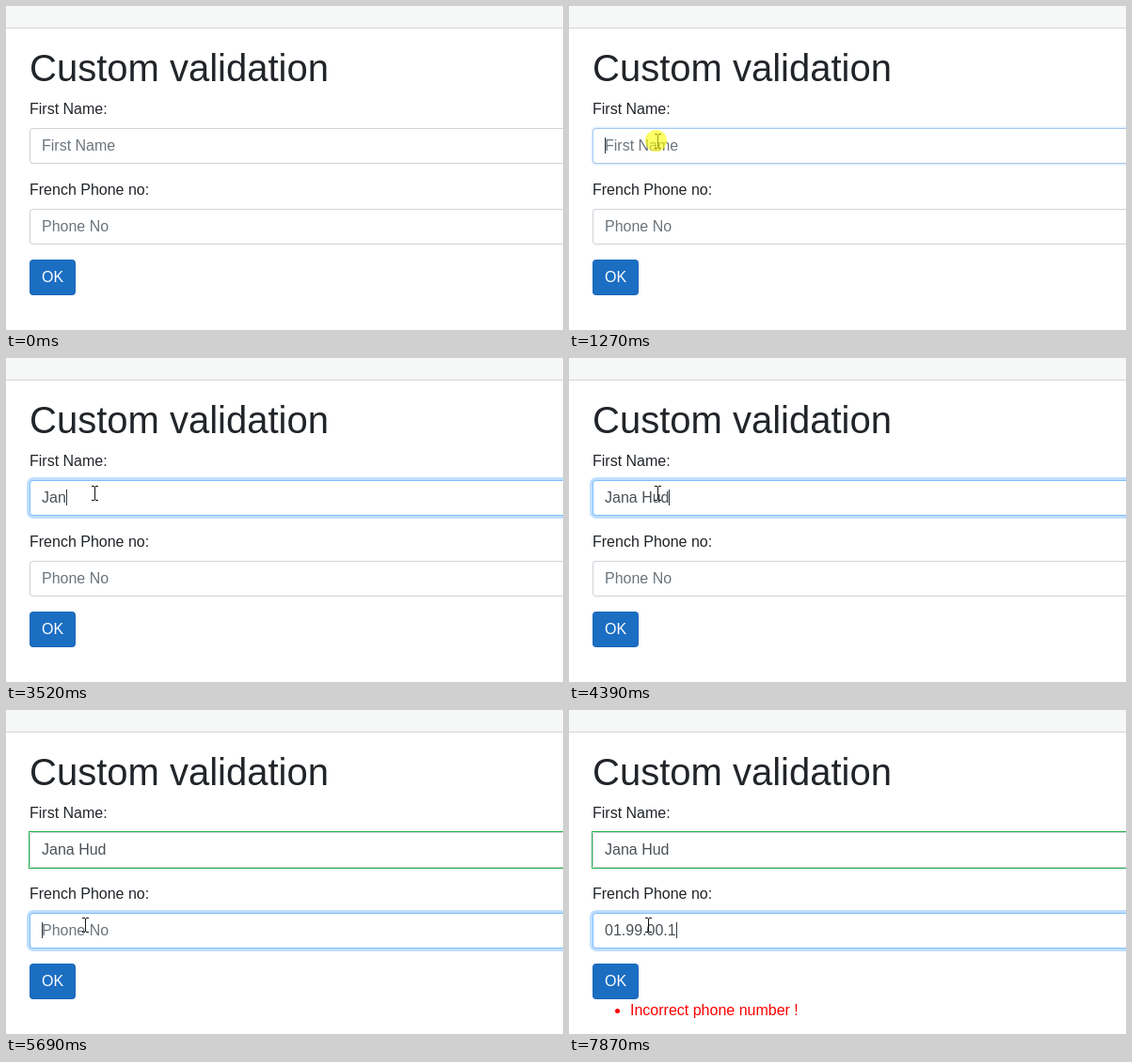
An HTML page with a canvas that plays this animation: 592 px wide and 345 px high, repeating every 8 s.

```html
<!DOCTYPE html>
<html lang="en">
<head>
<meta charset="utf-8">
<title>Custom validation</title>
<style>
  html, body { margin: 0; width: 100%; height: 100%; overflow: hidden; background: #fff; }
  canvas { display: block; width: 592px; height: 345px; }
</style>
</head>
<body>
<canvas id="stage" width="592" height="345"></canvas>
<script>
const ctx = document.getElementById('stage').getContext('2d');
const W = 592, H = 345, LOOP = 8000;
const FONT = '"Liberation Sans", Arial, sans-serif';
const INK = '#212529', RED = '#f00';

// All times in ms
const NAME_CLICK = 1190, PHONE_CLICK = 5540, FADE_STEP = 70, BLINK = 540;
const name = { text: 'Jana Hud', runs: [{ from: 2830, gap: 140, n: 2 }, { from: 3520, gap: 174, n: 6 }] };
const phone = { text: '0199001', runs: [{ from: 6090, gap: 296, n: 7 }] };

const clamp = (v, lo, hi) => Math.min(hi, Math.max(lo, v));
const mix = (a, b, k) => a + (b - a) * k;

// Eased 0..1 progress, held for a number of equal steps
function glide(t, from, to, steps) {
  const p = Math.floor(clamp((t - from) / (to - from), 0, 1) * steps) / steps;
  return Math.sin(p * Math.PI / 2);
}

const fade = (t, from) => clamp(Math.floor((t - from) / FADE_STEP) / 2, 0, 1);

// Text typed so far and the time of the last key
function typing(t, { text, runs }) {
  let count = 0, last = 0;
  for (const { from, gap, n } of runs) {
    const done = clamp(Math.floor((t - from) / gap) + 1, 0, n);
    if (done) last = from + (done - 1) * gap;
    count += done;
  }
  return { value: text.slice(0, count), last };
}

const blinkOn = (t, since) => Math.floor((t - since) / BLINK) % 2 === 0;

function text(str, x, y, color, size = 16) {
  ctx.font = size + 'px ' + FONT;
  ctx.fillStyle = color;
  ctx.fillText(str, x, y);
}

function box(x, y, w, h, r, color) {
  ctx.beginPath();
  ctx.roundRect(x, y, w, h, r);
  ctx.fillStyle = color;
  ctx.fill();
}

function dot(x, y, r, color) {
  ctx.beginPath();
  ctx.arc(x, y, r, 0, 2 * Math.PI);
  ctx.fillStyle = color;
  ctx.fill();
}

function field(y, value, hint, { glow, valid, caret }) {
  const spread = 3 * glow;
  box(25 - spread, y - spread, W, 38 + 2 * spread, 4 + spread, `rgba(0,123,255,${0.25 * glow})`);
  box(25, y, W, 38, 4, `rgb(${mix(206, 128, glow)},${mix(212, 189, glow)},${mix(218, 255, glow)})`);
  box(26, y + 1, W, 36, 3, '#fff');
  if (valid) {
    ctx.lineWidth = 1;
    ctx.strokeStyle = '#26b050';
    ctx.strokeRect(24.5, y - 0.5, W, 39);
  }
  text(value || hint, 38, y + 24, value ? '#495057' : '#6c757d');
  if (caret) {
    const x = 38 + Math.round(ctx.measureText(value).width - 0.1);
    ctx.fillStyle = '#343a40';
    ctx.fillRect(x, y + 10, 1, 17);
  }
}

function beam(x, y) {
  ctx.fillStyle = '#111';
  ctx.fillRect(x, y - 7, 1, 14);
  for (const row of [y - 8, y + 7]) {
    ctx.fillRect(x - 3, row, 3, 1);
    ctx.fillRect(x + 1, row, 3, 1);
  }
}

function arrow(x, y) {
  ctx.save();
  ctx.translate(x + 0.5, y + 0.5);
  const path = new Path2D('M0 0V16L4 13L6.5 18.5L9 17.5L6.5 12H11.5Z');
  ctx.fillStyle = '#fff';
  ctx.fill(path);
  ctx.lineWidth = 1;
  ctx.strokeStyle = '#000';
  ctx.stroke(path);
  ctx.restore();
}

function drawPointer(t) {
  if (t < 200) return;
  const enter = glide(t, 200, 770, 7);
  const settle = glide(t, 960, 1040, 1);
  const leave = glide(t, 5075, 5380, 4);
  const x = Math.round(201 - 109 * enter + 2 * settle - 10 * leave);
  const y = Math.round(308 - 169 * enter + 5 * settle + 85 * leave);
  const overField = [130, 216].some(top => y >= top && y < top + 38);
  (overField ? beam : arrow)(x, y);

  const clicked = [NAME_CLICK, PHONE_CLICK].some(c => t >= c && t < c + 2 * FADE_STEP);
  if (clicked) dot(x - 1.5, y - 0.5, 11.5, 'rgba(255,255,0,0.6)');
}

function draw(t) {
  box(0, 0, W, H, 0, '#fff');
  box(0, 0, W, 23, 0, '#f6f7f7');
  box(0, 23, W, 1, 0, '#d6d5d5');

  text('Custom validation', 25, 80, INK, 40);
  text('First Name:', 25, 115, INK);
  text('French Phone no:', 25, 201, INK);

  const first = typing(t, name), second = typing(t, phone);
  const onPhone = t >= PHONE_CLICK;
  const moved = fade(t, PHONE_CLICK);
  field(130, first.value, 'First Name', {
    glow: fade(t, NAME_CLICK) - moved,
    valid: moved > 0,
    caret: t >= NAME_CLICK && !onPhone && blinkOn(t, first.last || NAME_CLICK)
  });
  field(216, second.value.replace(/(\d\d)(?=\d)/g, '$1.'), 'Phone No', {
    glow: moved,
    caret: onPhone && blinkOn(t, second.last || PHONE_CLICK)
  });

  box(25, 270, 49, 38, 4, '#1a68b8');
  box(26, 271, 47, 36, 3, '#1b6ec2');
  text('OK', 38, 294, '#fff');

  if (t >= 6150) {
    dot(51.5, 320.5, 2.5, RED);
    text('Incorrect phone number !', 65, 325, RED);
  }
  drawPointer(t);
}

const start = performance.now();
function tick() {
  draw((performance.now() - start) % LOOP);
  requestAnimationFrame(tick);
}
tick();
</script>
</body>
</html>
```
